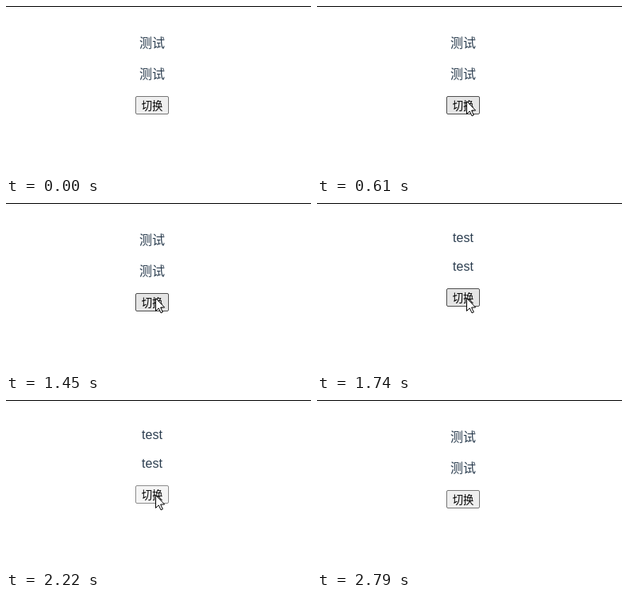
Recreate the animation shown at these times as an HTML page. Size 382 px wide and 212 px high, loop 3190 ms.

```html
<!DOCTYPE html>
<html lang="zh-CN">
<head>
<meta charset="utf-8">
<style>
html, body { margin: 0; width: 100%; height: 100%; overflow: hidden; background: #fff; }
svg { display: block; width: 382px; height: 212px; }
text { text-anchor: middle; font-family: "Liberation Sans", "Noto Sans CJK SC", "Noto Sans CJK", sans-serif; font-weight: 300; }
.line { font-size: 16px; fill: #2c3e50; }
.label { font-size: 13.333px; }
</style>
</head>
<body>
<svg viewBox="0 0 382 212">
  <rect width="382" height="1"/>
  <text class="line" id="first" x="183"></text>
  <text class="line" id="second" x="183"></text>
  <g id="button">
    <rect id="face" x="162.5" y=".5" width="41" height="22" rx="1.5"/>
    <text class="label" x="183" y="17">切换</text>
  </g>
  <path id="cursor" d="M.5 .5v16l3.7-3.6 2.8 6 2.3-1-2.7-5.9h5z" fill="#fff" stroke="#000"/>
</svg>
<script>
const LOOP = 3190, STEP = 40, HOLD = 80;
const ENTER = 120, LEAVE = 2420, GONE = 2790;
const presses = [890, 1290, 1660, 1820, 2020, 2220];
const [first, second, button, face, cursor] =
  ['first', 'second', 'button', 'face', 'cursor'].map(id => document.getElementById(id));

const views = {
  zh: { text: '测试', y: 52, gap: 39, top: 113 },
  en: { text: 'test', y: 49, gap: 36, top: 107 }
};
const styles = {
  idle: ['#efefef', '#767676'],
  hover: ['#e5e5e5', '#4f4f4f'],
  active: ['#f5f5f5', '#8d8d8d']
};

// Ease-out between two points, with its own power on each axis
function move(from, to, powers, time, duration) {
  const p = Math.min(1, Math.floor(time / STEP) * STEP / duration);
  return from.map((a, i) => Math.round(a + (to[i] - a) * (1 - (1 - p) ** powers[i])));
}

function pointer(t) {
  const rest = [187, 119];
  return t < LEAVE
    ? move([235, 205], rest, [4, 2.33], t - ENTER, 480)
    : move(rest, [288, 205], [1.44, 1.04], t - LEAVE, 320);
}

function draw(t) {
  // The language toggles when the button is released
  const toggles = presses.filter(p => t >= p + HOLD).length;
  const view = toggles % 2 ? views.en : views.zh;
  const shown = t >= ENTER && t < GONE;
  const [x, y] = pointer(t);
  const inside = shown && x >= 162 && x < 204 && y >= view.top && y < view.top + 23;
  const pressed = presses.some(p => t >= p && t < p + HOLD);
  const [fill, stroke] = styles[inside ? (pressed ? 'active' : 'hover') : 'idle'];

  cursor.style.display = shown ? '' : 'none';
  cursor.setAttribute('transform', `translate(${x} ${y})`);
  [first, second].forEach((line, i) => {
    line.textContent = view.text;
    line.setAttribute('y', view.y + i * view.gap);
  });
  button.setAttribute('transform', `translate(0 ${view.top})`);
  face.setAttribute('fill', fill);
  face.setAttribute('stroke', stroke);
}

const start = performance.now();
function tick() {
  draw((performance.now() - start) % LOOP);
  requestAnimationFrame(tick);
}
tick();
</script>
</body>
</html>
```
